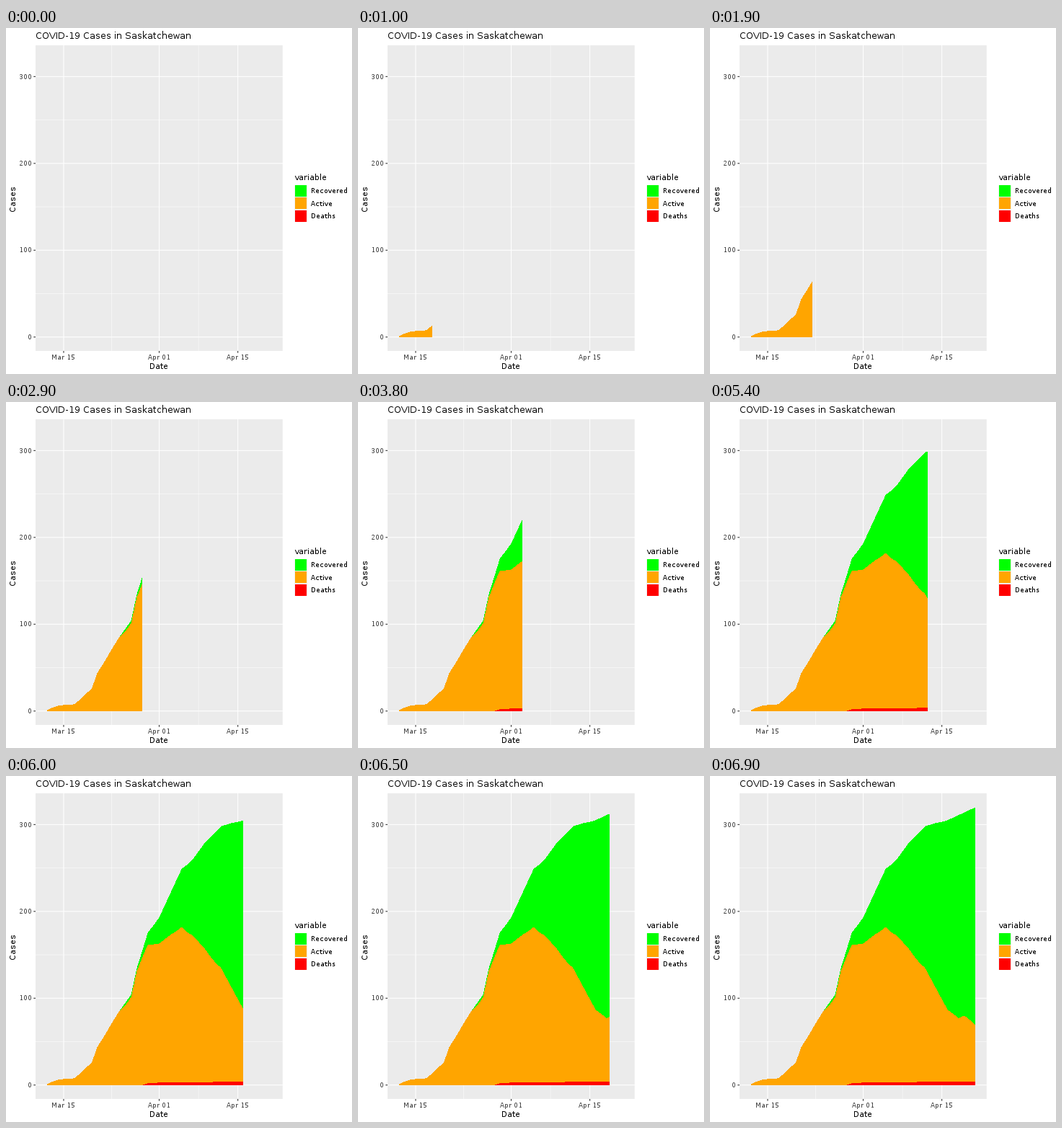
A matplotlib script that plays this animation: 480 by 480 pixels, repeating every 10000 ms.

```python
import numpy as np
import matplotlib.pyplot as plt
from matplotlib.animation import FuncAnimation
from matplotlib.patches import Rectangle

plt.rcParams.update({
    "font.family": "DejaVu Sans",
    "text.hinting": "default",
    "text.hinting_factor": 1,
})

SIZE, DPI = 480, 72
FRAMES, LAST = 100, 69
LEFT, RIGHT, TOP, BOTTOM = 41, 384, 24, 448

# Days since March 12; April 8 has no record.
days = np.delete(np.arange(41), 27)
reveal = np.round(LAST * days / 40)


def curve(*points):
    return np.round(np.interp(days, *zip(*points)))


total = curve((0, 1), (2, 6), (5, 8), (8, 26), (9, 44), (13, 86), (15, 104),
              (16, 134), (18, 176), (20, 193), (24, 249), (26, 260),
              (28, 278), (31, 298), (35, 305), (40, 320))
recovered = curve((13, 0), (14, 3), (16, 3), (18, 14), (20, 30), (24, 67),
                  (26, 88), (29, 136), (35, 218), (37, 234), (38, 234),
                  (40, 251))
deaths = 2 * (days >= 18) + (days >= 20) + (days >= 30)


def px(day):
    return LEFT + (day + 2) * (RIGHT - LEFT) / 44


def py(cases):
    return BOTTOM - (cases + 16) * (BOTTOM - TOP) / 352


fig = plt.figure(figsize=(SIZE / DPI, SIZE / DPI), dpi=DPI, facecolor="white")
ax = fig.add_axes([0, 0, 1, 1])
ax.set(xlim=(0, SIZE), ylim=(SIZE, 0))
ax.axis("off")


def box(x0, y0, x1, y1, color, z=0):
    x0, y0, x1, y1 = np.round([x0, y0, x1, y1])
    return ax.add_patch(Rectangle((x0, y0), x1 - x0, y1 - y0, fc=color, lw=0,
                                  zorder=z))


panel = box(LEFT, TOP, RIGHT, BOTTOM, "#EBEBEB")


def line(xs, ys, width, color="white", clip=True):
    item, = ax.plot(xs, ys, color=color, lw=width, zorder=1,
                    solid_capstyle="butt", snap=False)
    if clip:
        item.set_clip_path(panel)


def label(x, y, text, size, color="black", **kw):
    ax.text(x, y, text, size=size, color=color, va="baseline", zorder=5,
            rotation_mode="anchor", **kw)


# Grid, ticks and axis labels
for day in (11.5, 27, 42):
    line([px(day)] * 2, [TOP, BOTTOM], 0.53)
for cases in (50, 150, 250):
    line([LEFT, RIGHT], [py(cases)] * 2, 0.53)
for day, name in ((3, "Mar 15"), (20, "Apr 01"), (34, "Apr 15")):
    line([px(day)] * 2, [TOP, BOTTOM], 1.07)
    line([px(day)] * 2, [BOTTOM, BOTTOM + 2.74], 1.07, "#333333", False)
    label(px(day), 460, name, 8.8, "#4D4D4D", ha="center")
for cases in (0, 100, 200, 300):
    line([LEFT, RIGHT], [py(cases)] * 2, 1.07)
    line([LEFT - 2.74, LEFT], [py(cases)] * 2, 1.07, "#333333", False)
    label(36, py(cases) + 3.2, str(cases), 8.8, "#4D4D4D", ha="right")

label(LEFT, 15, "COVID-19 Cases in Saskatchewan", 13.2)
label(212, 473, "Date", 11, ha="center")
label(13, 236, "Cases", 11, ha="center", rotation=90)

# Legend
KEY, GAP = 17.28, 0.71
COLORS = {"Recovered": "#00FF00", "Active": "#FFA500", "Deaths": "#FF0000"}
label(400, 211, "variable", 11)
for n, (name, color) in enumerate(COLORS.items()):
    x, y = 400.4, 217.5 + n * KEY
    box(x, y, x + KEY, y + KEY, "#F2F2F2")
    box(x + GAP, y + GAP, x + KEY - GAP, y + KEY - GAP, color, 1)
    label(423, y + KEY / 2 + 3.2, name, 8.8)

# Hard-edged areas, one step per pixel column; each covers the one before.
edges = np.arange(round(px(0)), round(px(40)) + 1)
col_days = np.interp(edges[:-1] + 0.5, px(days), days)
areas = []
for n, (top, color) in enumerate(zip((total, total - recovered, deaths),
                                     COLORS.values())):
    tops = np.round(py(np.interp(col_days, days, top)))
    area = ax.stairs(tops, edges, baseline=round(py(0)), fill=True, fc=color,
                     lw=0, snap=False, zorder=2 + n)
    areas.append((area, tops))
ax.set(xlim=(0, SIZE), ylim=(SIZE, 0))


def draw(i):
    now = np.interp(min(i, LAST), reveal, days)
    count = int(round(px(now))) - edges[0]
    for area, tops in areas:
        area.set_visible(count > 0)
        if count > 0:
            area.set_data(tops[:count], edges[:count + 1])
    return [area for area, _ in areas]


anim = FuncAnimation(fig, draw, frames=FRAMES, interval=100,
                     init_func=lambda: draw(0), repeat=True, repeat_delay=0)
plt.show()
```
